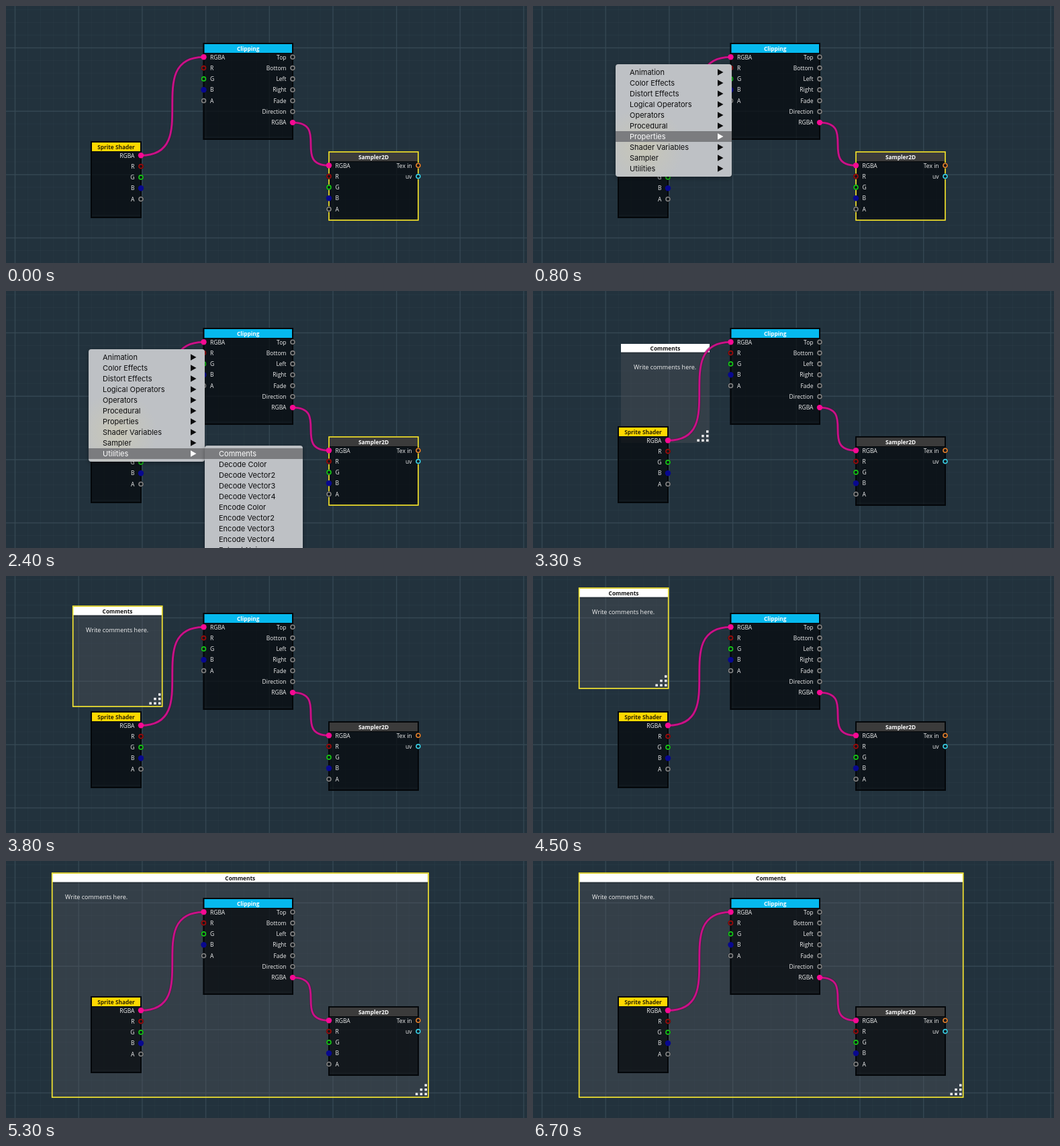
Write an HTML page with a canvas that moves like this. It is 776 px wide and 384 px high and loops after 6.8 s.

```html
<!DOCTYPE html>
<html lang="en">
<head>
<meta charset="utf-8">
<title>Node editor comments</title>
<style>
html, body { margin: 0; width: 100%; height: 100%; overflow: hidden; background: #22323d; }
canvas { display: block; }
</style>
</head>
<body>
<canvas id="stage" width="776" height="384"></canvas>
<script>
const W = 776, H = 384, LOOP = 6800, STEP = 100;
const ctx = document.getElementById('stage').getContext('2d');

const LABEL = '8.5px "Open Sans", "Noto Sans", sans-serif';
const NOTE = '9px "Open Sans", "Noto Sans", sans-serif';
const TITLE = 'bold 8.3px "Open Sans", "Noto Sans", sans-serif';
const MENU = '11px Inter, Roboto, sans-serif';

const PINK = '#f70a93', YELLOW = '#f5e532', GRAY = '#858585';
const CHANNELS = [['RGBA', PINK], ['R', '#a00b0b'], ['G', '#16cc16'], ['B', '#08088f'], ['A', GRAY]];
const grayPorts = names => names.map(name => [name, GRAY]);

const NODES = [
  { title: 'Sprite Shader', x: 126, y: 202, w: 76, h: 115, fill: '#ffd800', ink: '#2b2500', right: CHANNELS },
  { title: 'Clipping', x: 293.5, y: 55, w: 134.5, h: 145, fill: '#06b9ee', ink: '#fff', left: CHANNELS,
    right: [...grayPorts(['Top', 'Bottom', 'Left', 'Right', 'Fade', 'Direction']), CHANNELS[0]] },
  { title: 'Sampler2D', x: 480, y: 217, w: 135, h: 104, fill: '#3b3b3b', ink: '#fff', left: CHANNELS,
    right: [['Tex in', '#e8822c'], ['uv', '#39cfe6']] }
];
const MAIN_ITEMS = ['Animation', 'Color Effects', 'Distort Effects', 'Logical Operators', 'Operators',
  'Procedural', 'Properties', 'Shader Variables', 'Sampler', 'Utilities'];
const SUB_ITEMS = ['Comments', 'Decode Color', 'Decode Vector2', 'Decode Vector3', 'Decode Vector4',
  'Encode Color', 'Encode Vector2', 'Encode Vector3', 'Encode Vector4', 'Extract Noise'];

// Tracks: [time, value, value]
const POSITION = [[3500, 131, 79], [3800, 100, 46], [4100, 66, 12], [4400, 69, 19]];
const SIZE = [[4600, 132, 148], [4900, 400, 287], [5100, 515, 326], [5300, 559.5, 333],
  [5600, 571, 335], [6000, 573, 335], [6400, 571, 333]];
const HOVER = [[300, -1], [500, 0], [600, 3], [800, 6], [1100, 7], [1300, 9]];

function along(track, t) {
  if (t <= track[0][0]) return track[0].slice(1);
  const i = track.findIndex(key => key[0] > t);
  if (i < 0) return track[track.length - 1].slice(1);
  const a = track[i - 1], b = track[i], k = (t - a[0]) / (b[0] - a[0]);
  return [1, 2].map(n => a[n] + (b[n] - a[n]) * k);
}

function rect(x, y, w, h, fill) {
  ctx.fillStyle = fill;
  ctx.fillRect(x, y, w, h);
}

function text(s, x, y, font, fill, align = 'left') {
  ctx.font = font;
  ctx.fillStyle = fill;
  ctx.textAlign = align;
  ctx.textBaseline = 'alphabetic';
  ctx.fillText(s, x, y);
}

function outline(x, y, w, h) {
  ctx.strokeStyle = YELLOW;
  ctx.lineWidth = 1.7;
  ctx.strokeRect(x, y, w, h);
}

function gridLines(gap, color, width) {
  ctx.strokeStyle = color;
  ctx.lineWidth = width;
  ctx.beginPath();
  for (let x = 13.5 % gap; x < W; x += gap) { ctx.moveTo(x, 0); ctx.lineTo(x, H); }
  for (let y = 62.5 % gap; y < H; y += gap) { ctx.moveTo(0, y); ctx.lineTo(W, y); }
  ctx.stroke();
}

function background() {
  rect(0, 0, W, H, '#22323d');
  gridLines(94.7 / 5, 'rgba(70,92,105,.13)', 1);
  gridLines(94.7, 'rgba(75,96,108,.4)', 1.5);
}

function link(x1, y1, x2, y2) {
  ctx.beginPath();
  ctx.moveTo(x1, y1);
  ctx.bezierCurveTo(x2, y1, x1, y2, x2, y2);
  for (const [color, width] of [['rgba(70,10,60,.45)', 4.5], ['#cb1187', 2.8]]) {
    ctx.strokeStyle = color;
    ctx.lineWidth = width;
    ctx.stroke();
  }
}

function disc(x, y, r, fill) {
  ctx.beginPath();
  ctx.arc(x, y, r, 0, 2 * Math.PI);
  ctx.fillStyle = fill;
  ctx.fill();
}

function port(x, y, name, color) {
  const solid = name === 'RGBA' || name === 'B';
  disc(x, y, 4.2, solid ? color : '#10161b');
  if (solid) return;
  ctx.beginPath();
  ctx.arc(x, y, 3, 0, 2 * Math.PI);
  ctx.strokeStyle = color;
  ctx.lineWidth = 1.6;
  ctx.stroke();
}

function node({ title, x, y, w, h, fill, ink, left = [], right = [] }, selected) {
  rect(x, y, w, h, 'rgba(4,6,10,.68)');
  ctx.strokeStyle = '#04070a';
  ctx.lineWidth = 2;
  ctx.strokeRect(x + 1, y + 1, w - 2, h - 2);
  rect(x + 2, y + h - 4.5, w - 4, 1, 'rgba(50,60,68,.25)');
  rect(x + 2, y + 2, w - 4, 13, fill);
  rect(x + 2, y + 15, w - 4, 1, '#04070a');
  text(title, x + w / 2, y + 11.7, TITLE, ink, 'center');
  if (selected) outline(x + 1, y + 1, w - 2, h - 2);
  const rowY = i => y + 21.3 + i * 16.3;
  left.forEach(([name, color], i) => {
    port(x + 1, rowY(i), name, color);
    text(name, x + 10.5, rowY(i) + 3.2, LABEL, '#f2f2f2');
  });
  right.forEach(([name, color], i) => {
    port(x + w - 1, rowY(i), name, color);
    text(name, x + w - 10.5, rowY(i) + 3.2, LABEL, '#f2f2f2', 'right');
  });
}

function comment(t) {
  const [x, y] = along(POSITION, t), [w, h] = along(SIZE, t);
  rect(x, y, w, h, 'rgba(90,90,95,.33)');
  rect(x, y + 12.5, w, 2, 'rgba(0,0,0,.2)');
  rect(x, y, w, 12.5, '#fff');
  text('Comments', x + w / 2, y + 9.7, TITLE, '#111', 'center');
  text('Write comments here.', x + 19, y + 38.4, NOTE, '#f2f2f2');
  for (let row = 0; row < 3; row++)
    for (let col = 0; col <= row; col++)
      rect(x + w - 5 - col * 6.8, y + h - 18.7 + row * 6.6, 3.5, 3.5, '#f4f4f4');
  if (t >= 3500) outline(x - 0.3, y - 1, w + 1, h + 2);
}

function menu(items, x, y, w, active, arrows) {
  const h = items.length * 16 + 8;
  ctx.beginPath();
  ctx.roundRect(x, y, w, h, 4);
  ctx.save();
  ctx.shadowColor = 'rgba(0,0,0,.35)';
  ctx.shadowBlur = 6;
  ctx.shadowOffsetY = 2;
  ctx.fillStyle = '#bec1c5';
  ctx.fill();
  ctx.restore();
  if (arrows) {
    // Soft tint of the yellow title behind the translucent menu
    const glow = ctx.createRadialGradient(165, 211, 5, 165, 211, 60);
    glow.addColorStop(0, 'rgba(212,206,165,.4)');
    glow.addColorStop(1, 'rgba(212,206,165,0)');
    ctx.fillStyle = glow;
    ctx.fill();
  }
  items.forEach((item, i) => {
    const mid = y + 12 + i * 16, ink = i === active ? '#fff' : '#0c0c0d';
    if (i === active) rect(x, mid - 8, w, 16, '#7b7c7f');
    text(item, x + 21, mid + 4, MENU, ink);
    if (!arrows) return;
    ctx.beginPath();
    ctx.moveTo(x + 152, mid - 4.8);
    ctx.lineTo(x + 160.5, mid);
    ctx.lineTo(x + 152, mid + 4.8);
    ctx.fill();
  });
}

function draw(t) {
  background();
  if (t >= 2600) comment(t);
  link(201, 223.3, 294.5, 76.3);
  link(427, 174.1, 481, 238.3);
  NODES.forEach(n => node(n, n.title === 'Sampler2D' && t < 2600));
  if (t >= 300 && t < 2500) {
    const active = HOVER.filter(key => key[0] <= t).pop()[1];
    menu(MAIN_ITEMS, 123, 87, 173, active, true);
    if (t >= 1500) menu(SUB_ITEMS, 296, 231, 146, t >= 1900 ? 0 : -1, false);
  }
}

const start = performance.now();
function tick() {
  const t = (performance.now() - start) % LOOP;
  draw(Math.floor(t / STEP) * STEP);
  requestAnimationFrame(tick);
}
tick();
</script>
</body>
</html>
```
